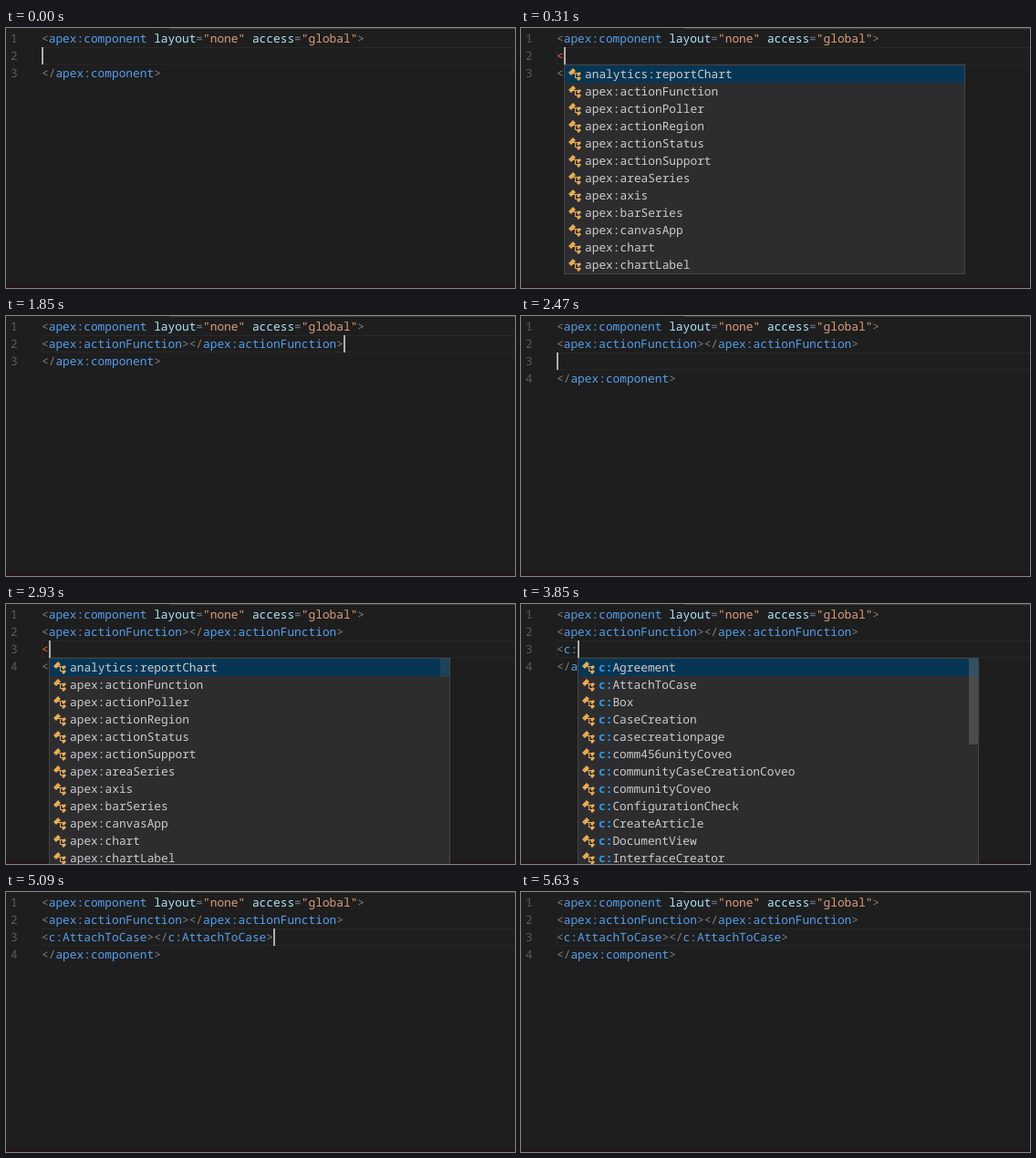
An HTML page with a canvas for the animation above (6170 ms loop, 558 by 285 pixels).

```html
<!DOCTYPE html>
<html lang="en">
<head>
<meta charset="utf-8">
<title>Component autocomplete</title>
<style>
  html, body { margin: 0; width: 100%; height: 100%; overflow: hidden; background: #1e1e1e; }
  canvas { display: block; }
</style>
</head>
<body>
<canvas id="stage" width="558" height="285"></canvas>
<script>
const ctx = document.getElementById('stage').getContext('2d');
const W = 558, H = 285, LOOP = 6170, BLINK = 535;
const LEFT = 39, TOP = 2, ROW = 19, BASE = 14, CHAR = 7.697;
const FONT = '12.83px "Noto Sans Mono", "DejaVu Sans Mono", monospace';
const INK = {
  punct: '#808080', tag: '#559fee', attr: '#aee6ff', string: '#dc9f78',
  error: '#f2692f', number: '#5a5a5a', item: '#cccccc', match: '#2a9ae8'
};
const ICON = new Path2D('M13 10l2 2-3 3-2-2 1-1H8V7H6L4 9 1 6l5-5 3 3-2 2h5l1-1 2 2-3 3-2-2 1-1H9v4l2.999.002L13 10z');

const OPEN = '<apex:component layout="none" access="global">';
const CLOSE = '</apex:component>';
const ACTION = '<apex:actionFunction></apex:actionFunction>';
const ATTACH = '<c:AttachToCase></c:AttachToCase>';

const STANDARD = ['analytics:reportChart'].concat(
  ('actionFunction actionPoller actionRegion actionStatus actionSupport ' +
   'areaSeries axis barSeries canvasApp chart chartLabel')
    .split(' ').map(name => 'apex:' + name));
const CUSTOM = ('Agreement AttachToCase Box CaseCreation casecreationpage ' +
  'comm456unityCoveo communityCaseCreationCoveo communityCoveo ' +
  'ConfigurationCheck CreateArticle DocumentView InterfaceCreator')
    .split(' ').map(name => 'c:' + name);

// Each step: start time, lines typed before the closing tag, optional popup.
// "caret" is when the blink restarts, if later than the step itself.
const STEPS = [
  { at: 0, lines: [''] },
  { at: 310, lines: ['<'], items: STANDARD, thumb: 20, showAt: 310, fadeAt: 730, picks: 1300 },
  { at: 1780, lines: [ACTION], caret: 1850 },
  { at: 2390, lines: [ACTION, ''] },
  { at: 2930, lines: [ACTION, '<'], items: STANDARD, thumb: 20, showAt: 2890 },
  { at: 3390, lines: [ACTION, '<c'], items: CUSTOM, match: 1, thumb: 94 },
  { at: 3850, lines: [ACTION, '<c:'], items: CUSTOM, match: 2, thumb: 94, fadeAt: 4350, picks: 4630 },
  { at: 5020, lines: [ACTION, ATTACH], caret: 5095 }
];

const clamp = v => Math.min(1, Math.max(0, v));

function rect(x, y, w, h, color) {
  ctx.fillStyle = color;
  ctx.fillRect(x, y, w, h);
}

function text(str, x, y, color, bold) {
  ctx.font = (bold ? 'bold ' : '') + FONT;
  ctx.fillStyle = color;
  ctx.fillText(str, x, y);
}

function codeLine(line, y) {
  if (line === '<') return text(line, LEFT, y, INK.error);
  let col = 0, last = '';
  for (const part of line.match(/"[^"]*"|[<\/>=]+|\s+|[\w:]+/g) || []) {
    const kind = part[0] === '"' ? 'string'
      : /[<\/>=]/.test(part[0]) ? 'punct'
      : /[<\/]$/.test(last) ? 'tag' : 'attr';
    text(part, LEFT + col * CHAR, y, INK[kind]);
    col += part.length;
    last = part;
  }
}

function popup(step, x, y, t) {
  const { items, match = 0, showAt = 0, fadeAt = LOOP } = step;
  const selected = t >= step.picks ? 1 : 0;
  rect(x, y, 440, 230, '#454545');
  rect(x + 1, y + 1, 438, 228, '#2d2d30');
  items.forEach((name, i) => {
    const top = y + 1 + i * ROW;
    if (i === selected) rect(x + 1, top, 438, ROW, '#073655');
    ctx.save();
    ctx.translate(x + 4, top + 2);
    ctx.fillStyle = '#e8ab53';
    ctx.fill(ICON);
    ctx.restore();
    text(name.slice(0, match), x + 23, top + BASE, INK.match, true);
    text(name.slice(match), x + 23 + match * CHAR, top + BASE, INK.item);
  });
  const alpha = clamp((t - showAt) / 90) * (1 - clamp((t - fadeAt) / 800));
  rect(x + 429, y + 1, 10, step.thumb, `rgba(121,121,121,${0.4 * alpha})`);
}

function draw(t) {
  const step = STEPS.filter(s => s.at <= t).pop();
  const lines = [OPEN, ...step.lines, CLOSE];
  const row = step.lines.length;
  const y = TOP + row * ROW;
  const typed = lines[row].length;

  rect(0, 0, W, H, '#1e1e1e');
  rect(179, 0, W - 179, 1, '#404040');
  rect(0, 281, W, 4, '#1f1719');

  // Current line outline
  rect(LEFT, y, W - LEFT, ROW, '#282828');
  rect(LEFT + 1, y + 1, W - LEFT - 1, ROW - 2, '#1e1e1e');

  lines.forEach((line, i) => {
    const base = TOP + i * ROW + BASE;
    text(String(i + 1), 5, base, INK.number);
    codeLine(line, base);
  });

  const idle = Math.max(0, t - (step.caret || step.at));
  if (Math.floor(idle / BLINK) % 2 === 0) {
    rect(Math.round(LEFT + typed * CHAR), y, 2, ROW, '#aeafad');
  }
  if (step.items) popup(step, Math.floor(LEFT + typed * CHAR + 0.4), y + ROW, t);
}

ctx.textRendering = 'geometricPrecision';
const start = performance.now();
function frame() {
  draw((performance.now() - start) % LOOP);
  requestAnimationFrame(frame);
}
frame();
</script>
</body>
</html>
```
